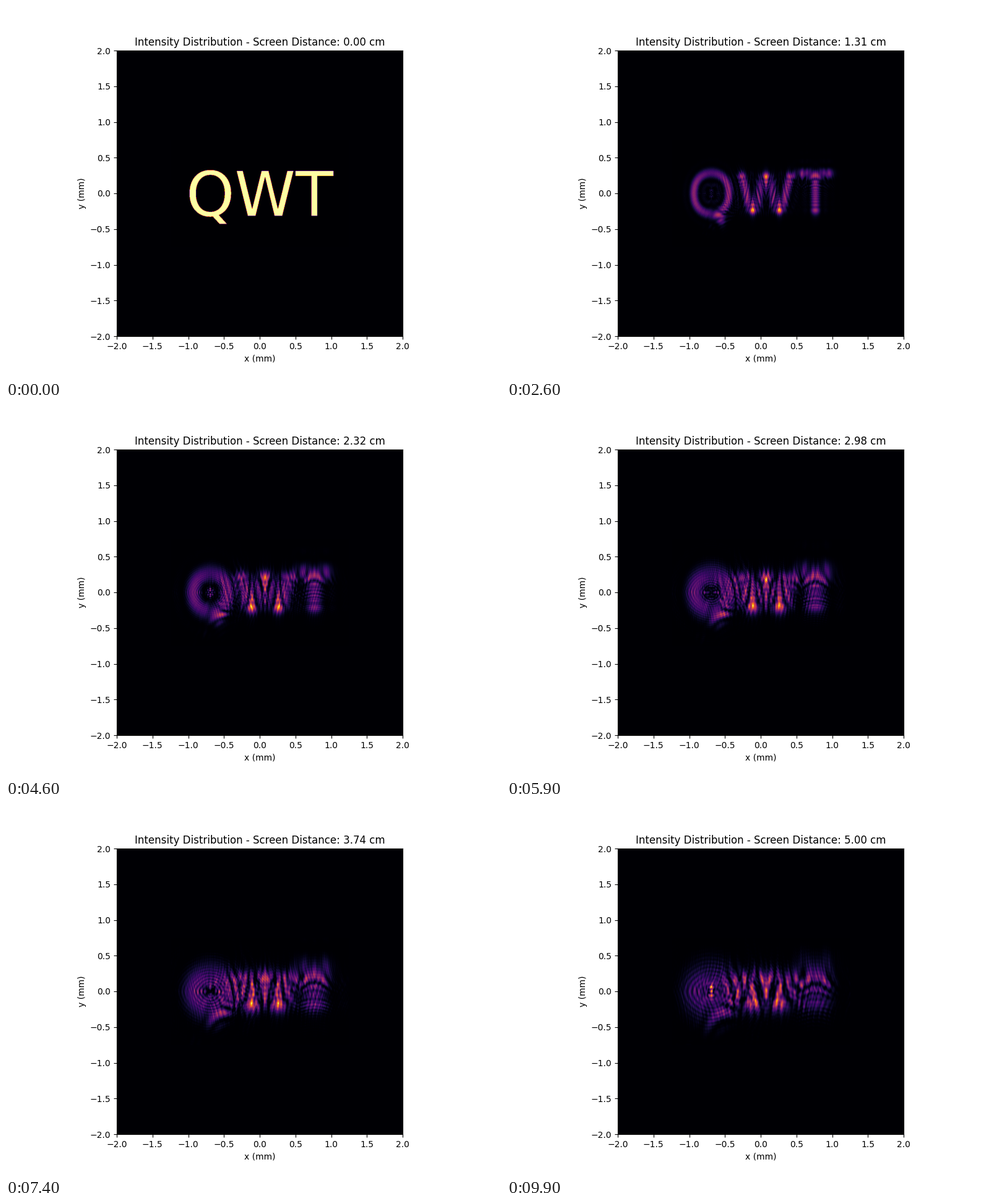
Write a matplotlib script that moves like this. It is 800x600 px and loops after 10000 ms.

```python
import numpy as np
import matplotlib.pyplot as plt
from matplotlib.animation import FuncAnimation
from matplotlib.path import Path
from matplotlib.textpath import TextPath

FRAMES = 100
WAVELENGTH = 632.8e-6   # all lengths in mm
Z_MAX = 50.0
HALF = 2.0
N = 1024
EM = 0.8618             # letter size
ORIGIN = (-1.0337, -0.3141)

step = 2 * HALF / N
axis = (np.arange(N) + 0.5) * step - HALF


def text_mask(text):
    """Aperture that is open inside the letters."""
    gx, gy = np.meshgrid(axis, axis)
    near = (np.abs(gx) < 1.1) & (np.abs(gy) < 0.5)
    points = np.column_stack([gx[near], gy[near]])
    inside = np.zeros(len(points), bool)
    outline = TextPath((0, 0), text, size=1000, prop={"family": "DejaVu Sans"})
    for poly in outline.to_polygons():
        inside ^= Path(poly * EM / 1000 + ORIGIN).contains_points(points)
    mask = np.zeros((N, N))
    mask[near] = inside
    return mask


spectrum = np.fft.fft2(text_mask("QWT"))
freq2 = np.fft.fftfreq(N, step) ** 2

# Only the lit part of the screen is evaluated.
rows = slice(320, 704)
cols = slice(192, 832)


def intensity(z):
    h = np.exp(-1j * np.pi * WAVELENGTH * z * freq2)
    field = np.fft.ifft(spectrum * h[:, None], axis=0)[rows]
    field = np.fft.ifft(field * h, axis=1)[:, cols]
    power = field.real ** 2 + field.imag ** 2
    return power / power.max()


def edges(part):
    return [part.start * step - HALF, part.stop * step - HALF]


plt.rcParams["font.family"] = "DejaVu Sans"
fig, ax = plt.subplots(figsize=(8, 6), dpi=100)
ax.set_facecolor(plt.get_cmap("inferno")(0))
image = ax.imshow(intensity(0), cmap="inferno", vmin=0, vmax=1,
                  origin="lower", extent=edges(cols) + edges(rows))
ax.set_xlim(-HALF, HALF)
ax.set_ylim(-HALF, HALF)
ax.set_xlabel("x (mm)")
ax.set_ylabel("y (mm)")
title = ax.set_title("")


def update(i):
    z = Z_MAX * i / (FRAMES - 1)
    image.set_data(intensity(z))
    title.set_text(f"Intensity Distribution - Screen Distance: {z / 10:.2f} cm")
    return image, title


anim = FuncAnimation(fig, update, frames=FRAMES, interval=100, repeat=True)
plt.show()
```
